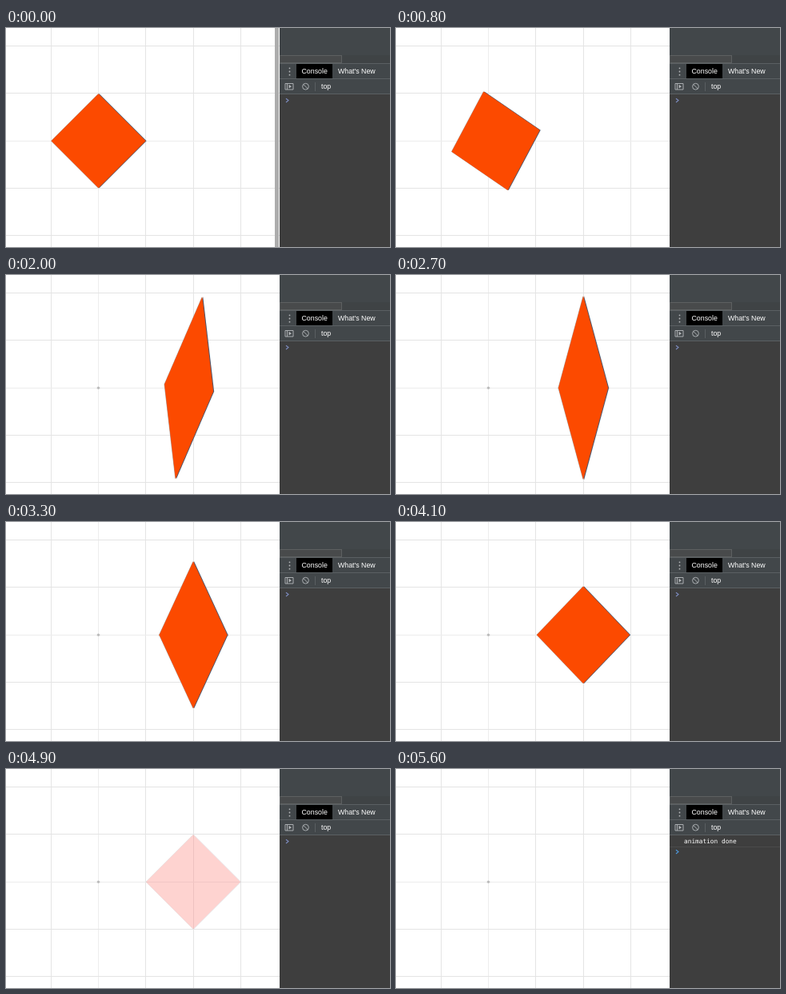
Animation of 480 by 274 pixels, one loop 6400 ms. Source, as an HTML page:

```html
<!DOCTYPE html>
<html lang="en">
<head>
<meta charset="utf-8">
<title>Diamond animation</title>
<style>
  html, body { margin: 0; width: 100%; height: 100%; overflow: hidden; background: #fff; }
  svg { display: block; width: 480px; height: 274px; }
  text { font: 8.8px "Liberation Sans", Arial, sans-serif; fill: #fff; }
  .mono { font: 7.8px "DejaVu Sans Mono", monospace; }
  .icon { fill: none; stroke: #a9adb0; }
</style>
</head>
<body>
<svg viewBox="0 0 480 274">
  <rect width="480" height="274" fill="#fff"/>
  <g id="grid"></g>
  <circle cx="115.5" cy="141.2" r="1.7" fill="#bcbcbc"/>

  <g id="shape">
    <polygon class="face" fill="#a89a95" transform="translate(-.5 0)"/>
    <polygon class="face edge" fill="#4c566c" transform="translate(1 .1)"/>
    <polygon class="face" id="fill"/>
  </g>

  <rect id="bar" x="336" width="5" height="274" fill="#adadad"/>

  <!-- console panel -->
  <rect x="342" width="138" height="274" fill="#3e3e3e"/>
  <rect x="342" width="138" height="82" fill="#42474a"/>
  <rect x="342" y="34" width="138" height="10" fill="#3f4345"/>
  <rect x="342.5" y="34.5" width="77" height="9" fill="#484a4b" stroke="#5d6061"/>
  <path d="M342 44.5H480M342 63.5H480M342 82.5H480" stroke="#5b6063"/>
  <rect x="363" y="45" width="45" height="18" fill="#000"/>
  <g fill="#b4b7b9">
    <circle cx="354.5" cy="50.3" r=".9"/>
    <circle cx="354.5" cy="54.5" r=".9"/>
    <circle cx="354.5" cy="58.7" r=".9"/>
    <path d="M353.5 70.8L357 73.2L353.5 75.6Z"/>
  </g>
  <path class="icon" d="M349 69.5H359V77H349ZM351.5 69.5V77"/>
  <circle class="icon" cx="374.5" cy="73.2" r="3.9"/>
  <path class="icon" d="M371.8 70.5L377.2 75.9"/>
  <path d="M386.5 68V79" stroke="#5a5f62"/>
  <text x="369.5" y="57.3">Console</text>
  <text x="415" y="57.3">What's New</text>
  <text x="394" y="76.2">top</text>
  <g id="message">
    <text class="mono" x="360" y="93">animation done</text>
    <path d="M342 97.5H480" stroke="#4b4b4b"/>
  </g>
  <path id="prompt" d="M350 88.2L353 90.6L350 93" fill="none" stroke-width="1.1"/>
</svg>

<script>
const LOOP = 6400, STEP = 100;
const ORIGIN = { x: 115.6, y: 141.2 }, CELL = 59.25, RADIUS = 59;
const ORANGE = [252, 74, 0], PINK = [255, 160, 190];
const $ = id => document.getElementById(id);
const faces = document.querySelectorAll('.face');

const inOutQuad = u => u < .5 ? 2 * u * u : 1 - 2 * (1 - u) ** 2;
const tween = (t, start, length) =>
  inOutQuad(Math.min(1, Math.max(0, (t - start) / length)));
const mix = (a, b, p) => a + (b - a) * p;

function drawGrid() {
  let svg = '';
  const line = (d, axis) => {
    svg += `<path d="${d}" stroke="${axis ? '#ededed' : '#e4e4e4'}"/>`;
  };
  for (let i = -1; i < 4; i++) line(`M${Math.floor(ORIGIN.x + i * CELL) + .5} 0V274`, i === 0);
  for (let i = -2; i < 3; i++) line(`M0 ${Math.floor(ORIGIN.y + i * CELL) + .5}H342`, i === 0);
  $('grid').innerHTML = svg;
}

function corners(x, y, angle, rx, ry) {
  const c = Math.cos(angle), s = Math.sin(angle);
  return [[0, -ry], [rx, 0], [0, ry], [-rx, 0]]
    .map(([a, b]) => `${(x + a * c - b * s).toFixed(2)},${(y + a * s + b * c).toFixed(2)}`)
    .join(' ');
}

function render(t) {
  const move = tween(t, 440, 1840);
  const back = tween(t, 2380, 1960);
  const fade = tween(t, 4340, 960);
  const stretch = move - back;

  const points = corners(
    ORIGIN.x + 2 * CELL * move, ORIGIN.y, -Math.PI * move,
    RADIUS * (1 - stretch / 2), RADIUS * (1 + stretch));
  faces.forEach(f => f.setAttribute('points', points));
  $('fill').setAttribute('fill',
    `rgb(${ORANGE.map((v, i) => Math.round(mix(v, PINK[i], fade)))})`);
  $('shape').setAttribute('opacity', 1 - fade);
  document.querySelector('.edge').setAttribute('opacity', 1 - fade);

  $('bar').setAttribute('opacity', t < 100 ? 1 : t < 200 ? .6 : t < 400 ? .25 : 0);

  const done = t >= 5400;
  $('message').setAttribute('visibility', done ? 'visible' : 'hidden');
  $('prompt').setAttribute('transform', `translate(0 ${done ? 13 : 0})`);
  $('prompt').setAttribute('stroke', done ? '#4f9be0' : '#7f8fc4');
}

drawGrid();
const begin = performance.now();
function frame() {
  const t = (performance.now() - begin) % LOOP;
  render(Math.floor(t / STEP) * STEP);
  requestAnimationFrame(frame);
}
frame();
</script>
</body>
</html>
```
